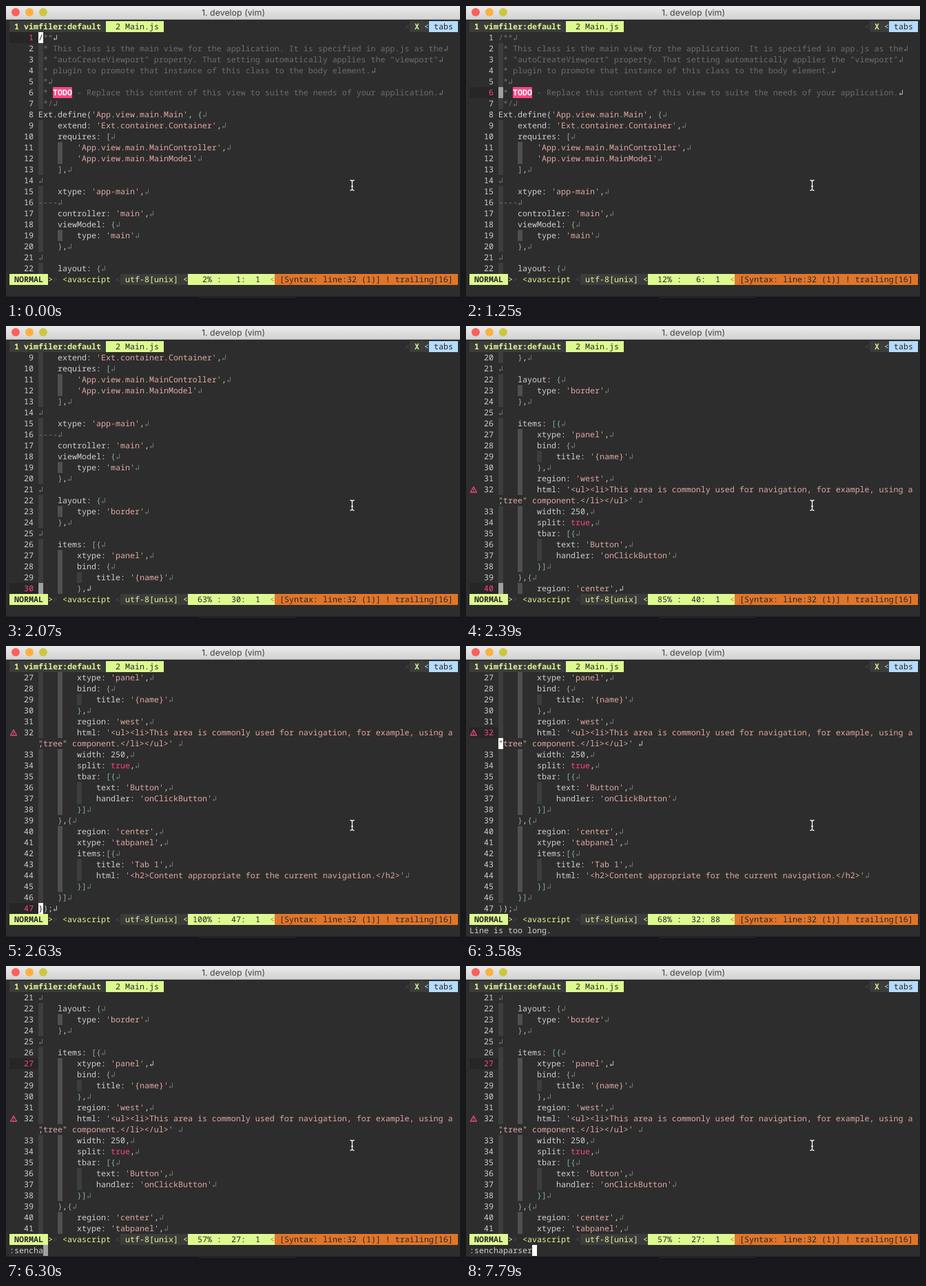
These frames come from a looping animation (659 by 425 pixels, 8 s). An HTML page:

```html
<!DOCTYPE html>
<html lang="en">
<head>
<meta charset="utf-8">
<title>Terminal editor</title>
<style>
  html, body { margin: 0; width: 100%; height: 100%; overflow: hidden; background: #2d2d2d; }
  svg { display: block; width: 659px; height: 425px; }
  text {
    font: 500 11.667px "Noto Sans Mono", "DejaVu Sans Mono", monospace;
    white-space: pre;
    text-rendering: geometricPrecision;
  }
  text.bold { font-weight: 600; }
  text.title { font: 400 12.4px Inter, "Open Sans", sans-serif; }
</style>
</head>
<body>
<svg id="stage" viewBox="0 0 659 425" xmlns="http://www.w3.org/2000/svg">
  <defs>
    <linearGradient id="bar" x2="0" y2="1">
      <stop offset="0" stop-color="#ebebeb"/>
      <stop offset="1" stop-color="#d3d3d3"/>
    </linearGradient>
    <clipPath id="view"><rect y="38" width="659" height="352"/></clipPath>
  </defs>
</svg>
<script>
const CW = 7, RH = 16, LEFT = 5, TEXT = 47, TOP = 38, WRAP = 87, ROWS = 22, LOOP = 8000;
const C = {
  bg: '#2d2d2d', panel: '#3c3c3c', lime: '#ddfa90', blue: '#b5dcfd', orange: '#e0752a',
  fg: '#cfcfcf', comment: '#6c6c6c', string: '#e0a8a0', bracket: '#7fae9a',
  pink: '#ff4384', faint: '#4a4a4a', eol: '#777', eolNow: '#c4c4c4', ink: '#262626'
};

const code = `/**
 * This class is the main view for the application. It is specified in app.js as the
 * "autoCreateViewport" property. That setting automatically applies the "viewport"
 * plugin to promote that instance of this class to the body element.
 *
 * TODO - Replace this content of this view to suite the needs of your application.
 */
Ext.define('App.view.main.Main', {
    extend: 'Ext.container.Container',
    requires: [
        'App.view.main.MainController',
        'App.view.main.MainModel'
    ],

    xtype: 'app-main',
----
    controller: 'main',
    viewModel: {
        type: 'main'
    },

    layout: {
        type: 'border'
    },

    items: [{
        xtype: 'panel',
        bind: {
            title: '{name}'
        },
        region: 'west',
        html: '<ul><li>This area is commonly used for navigation, for example, using a "tree" component.</li></ul>',
        width: 250,
        split: true,
        tbar: [{
            text: 'Button',
            handler: 'onClickButton'
        }]
    },{
        region: 'center',
        xtype: 'tabpanel',
        items:[{
            title: 'Tab 1',
            html: '<h2>Content appropriate for the current navigation.</h2>'
        }]
    }]
});`.split('\n');

const stage = document.getElementById('stage');

function add(parent, name, attrs, content) {
  const el = document.createElementNS('http://www.w3.org/2000/svg', name);
  for (const key in attrs) el.setAttribute(key, attrs[key]);
  if (content !== undefined) el.textContent = content;
  parent.appendChild(el);
  return el;
}
const box = (parent, x, y, w, h, fill) => add(parent, 'rect', { x, y, width: w, height: h, fill });
const label = (parent, x, y, s, fill, cls = '') =>
  add(parent, 'text', { x, y: y + 12, fill, class: cls }, s);

// Title bar
box(stage, 0, 0, 659, 425, C.bg);
box(stage, 0, 0, 659, 19, 'url(#bar)');
box(stage, 0, 19, 659, 1, '#a9a9a9');
[[14, '#fc605c'], [34, '#fdb03f'], [54, '#cdc740']].forEach(([cx, fill]) =>
  add(stage, 'circle', { cx, cy: 9, r: 6, fill }));
add(stage, 'text', { x: 330, y: 14, fill: '#404040', class: 'title', 'text-anchor': 'middle' }, '1. develop (vim)');

// Tab line
box(stage, 5, 22, 140, RH, C.panel);
label(stage, 12, 22, '1 vimfiler:default', C.lime, 'bold');
box(stage, 145, 22, 84, RH, C.lime);
label(stage, 159, 22, '2 Main.js', C.ink);
label(stage, 579, 22, '<', C.faint);
box(stage, 586, 22, 28, RH, C.panel);
label(stage, 593, 22, 'X', C.lime, 'bold');
label(stage, 607, 22, '<', C.blue);
box(stage, 614, 22, 42, RH, C.blue);
label(stage, 621, 22, 'tabs', C.ink);

// Code rows
const view = add(stage, 'g', { 'clip-path': 'url(#view)' });
const buffer = add(view, 'g', {});
const numberBack = box(buffer, LEFT, 0, 42, RH, '#262626');
const rows = [];   // one entry per screen row: { line, part }
const lines = [];  // per line: number and end mark elements

function tokens(s) {
  if (/^(\/\*| \*)/.test(s)) {
    const at = s.indexOf('TODO');
    return at < 0 ? [[0, s, C.comment]]
      : [[0, s.slice(0, at), C.comment], [at, 'TODO', '#fff'], [at + 4, s.slice(at + 4), C.comment]];
  }
  const out = [];
  for (const m of s.matchAll(/'[^']*'|----|true|[{}\[\]]+|[^'{}\[\]\s]+/g)) {
    const w = m[0];
    out.push([m.index, w, w[0] === "'" ? C.string : w === '----' ? C.eol
      : /^true/.test(w) ? (w === 'true' ? C.pink : C.fg) : /[{}\[\]]/.test(w) ? C.bracket : C.fg]);
  }
  return out;
}

function drawToken([col, s, fill], y) {
  if (s === 'TODO') box(buffer, TEXT + col * CW, y, 28, RH, C.pink);
  const lead = s.length - s.trimStart().length;
  label(buffer, TEXT + (col + lead) * CW, y, s.trim(), fill, s === 'TODO' ? 'bold' : '');
}

code.forEach((s, i) => {
  const y = rows.length * RH, n = i + 1;
  const indent = s === '----' ? 4 : s.search(/\S|$/);
  for (let col = 0; col < indent; col += 4)
    box(buffer, TEXT + col * CW, y, CW, RH, col % 8 ? '#505050' : '#3d3d3d');
  for (const [col, w, fill] of tokens(s)) {
    const room = WRAP - col;
    if (w.length > room) {
      drawToken([col, w.slice(0, room), fill], y);
      drawToken([0, w.slice(room), fill], y + RH);
    } else if (room <= 0) drawToken([-room, w, fill], y + RH);
    else drawToken([col, w, fill], y);
  }
  for (let part = 0; part <= Math.floor(s.length / WRAP); part++) rows.push({ line: n, part });
  lines.push({
    num: label(buffer, 40 - String(n).length * CW, y, n, C.fg),
    eol: label(buffer, TEXT + (s.length % WRAP) * CW, (rows.length - 1) * RH, '↲', C.eol)
  });
});

const warnY = 31 * RH;
add(buffer, 'path', {
  d: `M11 ${warnY + 4}l4.5 8h-9zM11 ${warnY + 7}v2.4m0 .8v1`,
  fill: 'none', stroke: '#e0487c', 'stroke-width': 1.3, 'stroke-linejoin': 'round'
});

// Status line
const SY = 390;
box(stage, 5, SY, 56, RH, C.lime);
label(stage, 12, SY, 'NORMAL', C.ink, 'bold');
label(stage, 61, SY, '>', C.lime);
label(stage, 68, SY, '>', C.faint);
label(stage, 82, SY, '<avascript', C.lime);
label(stage, 159, SY, '<', C.faint);
box(stage, 166, SY, 98, RH, C.panel);
label(stage, 173, SY, 'utf-8[unix]', C.lime);
label(stage, 257, SY, '<', C.lime);
box(stage, 264, SY, 126, RH, C.lime);
const position = label(stage, 271, SY, '', C.ink);
label(stage, 383, SY, '<', C.orange);
box(stage, 390, SY, 266, RH, C.orange);
label(stage, 397, SY, '[Syntax: line:32 (1)] ! trailing[16]', C.ink);

// Command line, cursor, desktop edge and mouse pointer
const CY = 406;
const command = label(stage, LEFT, CY, '', C.fg);
const cursor = box(stage, 0, 0, CW, RH, '#fff');
const under = label(stage, 0, 0, '', C.ink);
box(stage, 0, 423, 659, 2, '#17151a');
box(stage, 280, 424, 140, 1, '#3a2540');
add(stage, 'path', {
  d: 'M499.5 253.5q3 0 3 2.5q0-2.5 3-2.5M502.5 256v10M499.5 268.5q3 0 3-2.5q0 2.5 3 2.5M501 262.5h3',
  fill: 'none', stroke: '#f2f2f2', 'stroke-width': 1.3
});

const typed = ':senchaparser';
const keyTimes = [5420, 5540, 5780, 5950, 6010, 6180, 6300, 6890, 6950, 7190, 7370, 7610, 7790];

// Held keys repeat 30 rows a second, seen every 60 ms.
const SPEED = 0.03;
const snap = (t, from) => from + Math.floor((t - from) / 60) * 60;

function rowAt(t) {
  if (t < 960) return 1;
  if (t < 1130) return 2;
  if (t < 2930) return Math.min(48, Math.floor(23.1 + SPEED * (snap(t, 1130) - 1790)));
  if (t < 3170) return 47;
  if (t < 4180) return Math.max(21, 33 - Math.floor(SPEED * (snap(t, 3580) - 3580) + 0.01));
  return t < 4420 ? 22 : t < 4470 ? 24 : t < 4710 ? 26 : 27;
}

function topAt(t, row) {
  if (t < 2930) return row === 32 ? 12 : Math.max(1, row - ROWS + 1);
  return t < 4180 ? Math.min(27, row) : 21;
}

function draw(t) {
  const row = rowAt(t), top = topAt(t, row);
  const { line, part } = rows[row - 1];
  buffer.setAttribute('transform', `translate(0 ${TOP - (top - 1) * RH})`);
  lines.forEach(({ num, eol }, i) => {
    const now = i + 1 === line;
    num.setAttribute('fill', now ? C.pink : C.fg);
    eol.setAttribute('fill', now ? C.eolNow : C.eol);
  });
  numberBack.setAttribute('y', (row - 1 - part) * RH);

  const percent = Math.floor(line * 100 / code.length);
  const pad = (n, w) => String(n).padStart(w);
  position.textContent = `${pad(percent, 3)}% :${pad(line, 4)}:${pad(part * WRAP + 1, 3)}`;

  const count = keyTimes.filter(k => k <= t).length;
  command.textContent = count ? typed.slice(0, count) : line === 32 ? 'Line is too long.' : '';

  const x = count ? LEFT + count * CW : TEXT;
  const y = count ? CY : TOP + (row - top) * RH;
  const dim = (t >= 1130 && t < 2630) || count === 7;
  cursor.setAttribute('x', x);
  cursor.setAttribute('y', y);
  cursor.setAttribute('fill', dim ? '#a0a0a0' : '#fff');
  under.setAttribute('x', x);
  under.setAttribute('y', y + 12);
  under.textContent = count ? '' : (code[line - 1][part * WRAP] || '↲').trim();
}

function frame() {
  draw(performance.now() % LOOP);
  requestAnimationFrame(frame);
}
frame();
</script>
</body>
</html>
```
